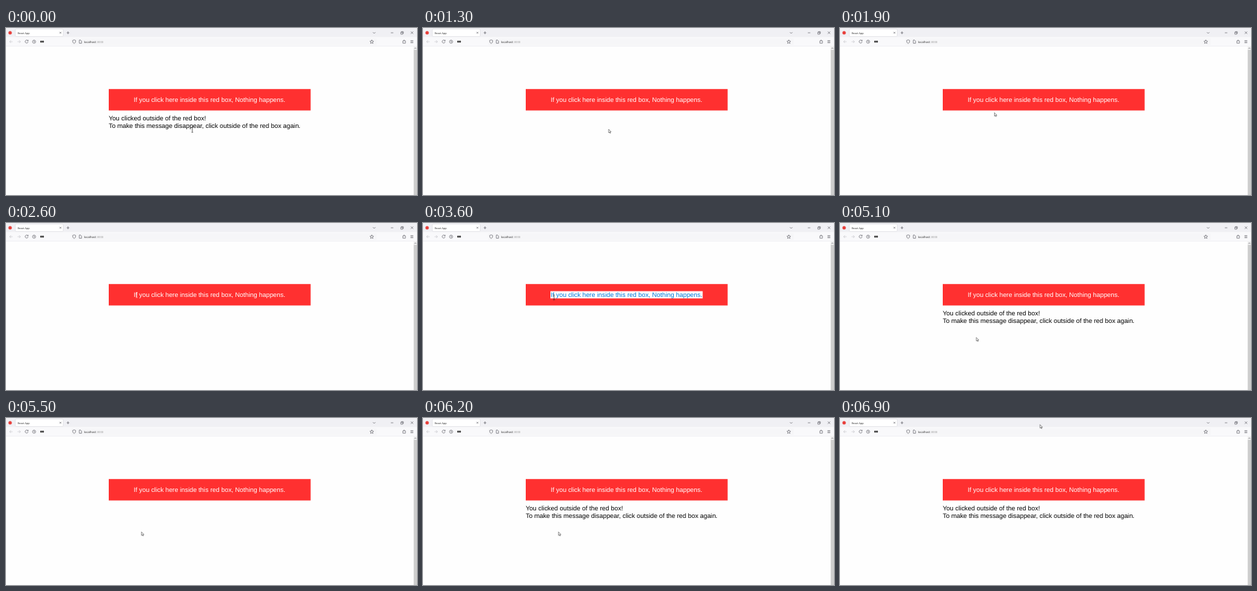
An HTML page that plays this animation: 600x244 px, repeating every 8000 ms.

```html
<!DOCTYPE html>
<html lang="en">
<head>
<meta charset="utf-8">
<title>Click outside</title>
<style>
  html, body { margin: 0; width: 100%; height: 100%; overflow: hidden; background: #fefefe; }
  svg { display: block; }
  text { font-family: "Liberation Sans", Arial, sans-serif; font-size: 9.35px; text-rendering: geometricPrecision; }
  .ui { font-family: "Open Sans", "Noto Sans", sans-serif; }
  .icons { fill: none; stroke: #4a4a52; stroke-width: .6; }
</style>
</head>
<body>
<svg width="600" height="244" viewBox="0 0 600 244">
  <rect width="600" height="244" fill="#fefefe"/>

  <!-- Browser window -->
  <rect width="600" height="13.5" fill="#f0f0f4"/>
  <rect y="13.5" width="600" height="13" fill="#f9f9fb"/>
  <rect y="26.2" width="600" height=".5" fill="#e6e6ea"/>
  <rect x="95" y="15" width="446" height="10" rx="1.5" fill="#f6f6f8"/>
  <rect x="13.5" y="1.5" width="70" height="11" rx="1.5" fill="#fff" stroke="#d4d4da" stroke-width=".5"/>
  <circle cx="6" cy="7" r="2.5" fill="#e8403c"/>
  <text class="ui" x="17" y="8.5" style="font-size:3.75px" fill="#222">React App</text>
  <text class="ui" x="114" y="21.7" style="font-size:4.2px" fill="#222">localhost<tspan fill="#999">:3000</tspan></text>
  <g class="icons">
    <path d="M78.3 5.7l2.4 2.4m0-2.4l-2.4 2.4M88.5 7h4M90.5 5v4"/>
    <path d="M535.7 6.2l1.8 1.8 1.8-1.8M561.8 7h3.6M576.4 6.2h2.8v2.8h-2.8zM577.2 6.2v-.9h2.8v2.8h-.8M591 5.2l3.4 3.4m0-3.4l-3.4 3.4"/>
    <path stroke="#c0c0c6" d="M9.7 20H5.3m2-2l-2 2 2 2M16.8 20h4.4m-2-2l2 2-2 2"/>
    <path d="M32 18.6a2.2 2.2 0 1 0 .3 1.8M32.3 17.4v1.6h-1.6"/>
    <circle cx="41" cy="20" r="2.3"/><path d="M41 18.5V20l1 .7"/>
    <path d="M97.3 18.2l2.2-.8 2.2.8c0 2.2-.6 3.6-2.2 4.5-1.6-.9-2.2-2.3-2.2-4.5z"/>
    <path d="M107 17.7h2l1.3 1.3v3.3H107z"/>
    <path d="M534 17.4l.8 1.7 1.9.2-1.4 1.3.4 1.9-1.7-1-1.7 1 .4-1.9-1.4-1.3 1.9-.2z"/>
    <path d="M579.4 18.8h1.2v-1h1.2v1h1.3v3.4h-3.7zM590.5 18.4h4m-4 1.6h4m-4 1.6h4"/>
  </g>
  <g fill="#333"><circle cx="51.3" cy="20" r="1.4"/><circle cx="54" cy="20" r="1.4"/></g>
  <rect x="595" y="26.7" width="5" height="217.3" fill="#f0f0f0"/>
  <rect x="595.3" y="32" width="4.7" height="212" fill="#cdcdcd"/>
  <path d="M596.3 30.3l1.3-1.4 1.3 1.4" class="icons"/>

  <!-- Page -->
  <rect x="150" y="89.2" width="294.7" height="31.3" fill="#ff3030"/>
  <rect id="selection" x="186" y="99.6" width="222.3" height="10.6" fill="#fff"/>
  <text id="label" x="186.5" y="108.3">If you click here inside this red box, Nothing happens.</text>
  <g id="message">
    <text x="150" y="135.4">You clicked outside of the red box!</text>
    <text x="150" y="146">To make this message disappear, click outside of the red box again.</text>
  </g>

  <!-- Pointers, hotspot at 0,0 -->
  <path id="arrow" d="M0 0v5.1l1.2-1.1 .8 1.8 .8-.35-.8-1.75h1.6z" fill="#fff" stroke="#222" stroke-width=".5"/>
  <path id="beam" d="M-1.2-3.7h.8L0-3.3l.4-.4h.8M0-3.3v6.6M-1.2 3.7h.8L0 3.3l.4.4h.8" fill="none" stroke-width=".7"/>
</svg>
<script>
const LOOP = 8000, STEP = 100;
const $ = id => document.getElementById(id);

// Pointer stops: time, x, y
const stops = [
  [0, 272, 148.7], [200, 272, 148.7], [400, 275, 176], [1200, 275, 176],
  [1300, 271, 148], [2400, 190.8, 105.2], [3500, 190.8, 105.2],
  [4200, 199, 167.3], [5100, 199, 167.3], [5500, 197.8, 166.5],
  [6300, 197.8, 166.5], [6900, 292, 9.7], [LOOP, 292, 9.7]
];

function pointerAt(t) {
  const i = stops.findIndex(s => s[0] > t);
  const [t0, x0, y0] = stops[i - 1], [t1, x1, y1] = stops[i];
  const u = (t - t0) / (t1 - t0), k = u * u * (3 - 2 * u);
  return [x0 + (x1 - x0) * k, y0 + (y1 - y0) * k];
}

const between = (v, low, high) => v >= low && v < high;
const show = (id, on) => $(id).setAttribute("visibility", on ? "visible" : "hidden");

function draw(now) {
  const t = Math.floor(now % LOOP / STEP) * STEP;
  const [x, y] = pointerAt(t);
  const selected = between(t, 3300, 4500);
  const message = t < 800 || between(t, 4500, 5300) || t >= 6200;
  const onLabel = between(x, 186, 409) && between(y, 99, 111);
  const onMessage = message && between(x, 150, 431) && between(y, 127, 150);
  const onText = onLabel || onMessage;

  show("selection", selected);
  show("message", message);
  $("label").setAttribute("fill", selected ? "#0078d7" : "#fff");
  show("arrow", !onText);
  show("beam", onText);
  $("beam").setAttribute("stroke", onLabel && !selected ? "#fff" : "#222");
  for (const id of ["arrow", "beam"]) $(id).setAttribute("transform", `translate(${x} ${y})`);
}

const start = performance.now();
(function tick() {
  draw(performance.now() - start);
  requestAnimationFrame(tick);
})();
</script>
</body>
</html>
```
